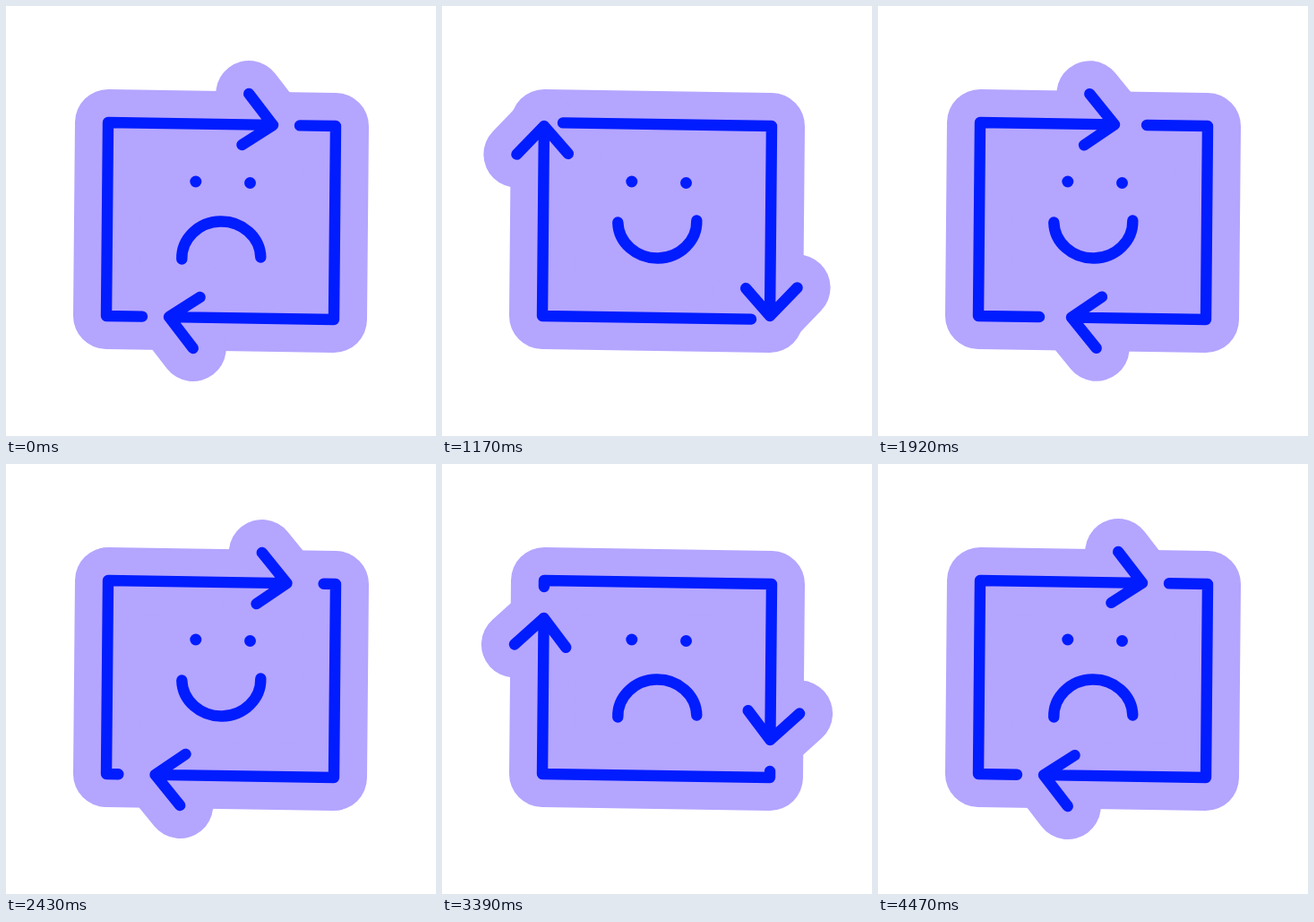
Write an HTML page that moves like this. It is 480 px wide and 480 px high and loops after 4500 ms.

```html
<!DOCTYPE html>
<html lang="en">
<head>
<meta charset="utf-8">
<title>Mood loop</title>
<style>
  html, body { margin: 0; width: 100%; height: 100%; overflow: hidden; background: #fff; }
  svg { display: block; width: 100%; height: 100%; }
  .back { fill: #b4a5ff; stroke: #b4a5ff; stroke-width: 74; }
  .halo { fill: none; stroke: #b4a5ff; stroke-width: 74; }
  .ink { fill: none; stroke: #001cff; stroke-width: 12.4; }
  .eye { fill: #001cff; }
  path { stroke-linecap: round; stroke-linejoin: round; }
</style>
</head>
<body>
<svg viewBox="0 0 480 480">
  <path class="back" d="M114 130L368 134L366 350L112 346Z"/>
  <path class="halo" id="halo"/>
  <path class="ink" id="lines"/>
  <circle class="eye" cx="211.8" cy="196" r="6.5"/>
  <circle class="eye" cx="272.5" cy="197.5" r="6.5"/>
  <path class="ink" id="mouth" d="M-44 -19.5A44 41 0 0 0 44 -21.5"/>
</svg>
<script>
const LOOP = 4500;
const HALF = 470;
const corners = [[114, 130], [368, 134], [366, 350], [112, 346]];
const starts = [0, 254, 470, 724, 940];

// Keys: time, value, slope
const travel = [
  [0, 184, .1], [540, 273, .27], [690, 316, .3], [1170, 466, .29], [1920, 620, .12],
  [2250, 650, .1], [2880, 750, .26], [3390, 898, .3], [4470, 1121, .1], [4500, 1124, .1]
];
const gaps = [
  [0, 30, 0], [690, 29, -.004], [1170, 25, 0], [1920, 36, .012],
  [2880, 43, 0], [3390, 35, -.008], [4470, 30, 0], [4500, 30, 0]
];

const el = id => document.getElementById(id);
const wrap = (v, n) => ((v % n) + n) % n;

function curve(keys, t) {
  let i = 0;
  while (i < keys.length - 2 && t >= keys[i + 1][0]) i++;
  const [t0, a, m0] = keys[i], [t1, b, m1] = keys[i + 1];
  const d = t1 - t0, u = (t - t0) / d, v = 1 - u;
  return v * v * ((1 + 2 * u) * a + u * d * m0) + u * u * ((3 - 2 * u) * b - v * d * m1);
}

function ease(t, from, to) {
  const u = Math.min(1, Math.max(0, (t - from) / (to - from)));
  return u * u * (3 - 2 * u);
}

function locate(s) {
  s = wrap(s, 2 * HALF);
  let side = 0;
  while (s >= starts[side + 1]) side++;
  const u = (s - starts[side]) / (starts[side + 1] - starts[side]);
  const a = corners[side], b = corners[(side + 1) % 4];
  return { side, p: [a[0] + (b[0] - a[0]) * u, a[1] + (b[1] - a[1]) * u] };
}

const poly = pts => "M" + pts.map(p => p[0].toFixed(2) + " " + p[1].toFixed(2)).join("L");

function shaft(from, to) {
  const pts = [locate(from).p];
  for (let turn = -1; turn < 3; turn++) {
    for (let i = 0; i < 4; i++) {
      const s = starts[i] + turn * 2 * HALF;
      if (s > from && s < to) pts.push(corners[i]);
    }
  }
  pts.push(locate(to).p);
  return poly(pts);
}

function head(s, sad) {
  const { side, p } = locate(s);
  const tilt = side % 2 ? 1 + 4 * sad : 8 + 1.5 * sad;
  const arm = (len, deg) => {
    const a = (side * 90 + tilt + 180 + deg) * Math.PI / 180;
    return [p[0] + len * Math.cos(a), p[1] + len * Math.sin(a)];
  };
  return poly([arm(44, 43), p, arm(41, -42)]);
}

function draw(t) {
  const turn = ease(t, 210, 670) + ease(t, 2613, 3073);
  const sad = Math.abs(1 - turn);
  const tip = curve(travel, t), gap = curve(gaps, t);
  let heads = "", shafts = "";
  for (const s of [tip, tip + HALF]) {
    heads += head(s, sad);
    shafts += shaft(s - HALF + gap, s);
  }
  el("halo").setAttribute("d", heads);
  el("lines").setAttribute("d", shafts + heads);
  el("mouth").setAttribute("transform", `translate(240.3 261) rotate(${180 * (1 + turn)})`);
}

let begin;
function tick(now) {
  if (begin === undefined) begin = now;
  draw(wrap(now - begin, LOOP));
  requestAnimationFrame(tick);
}
draw(0);
requestAnimationFrame(tick);
</script>
</body>
</html>
```
